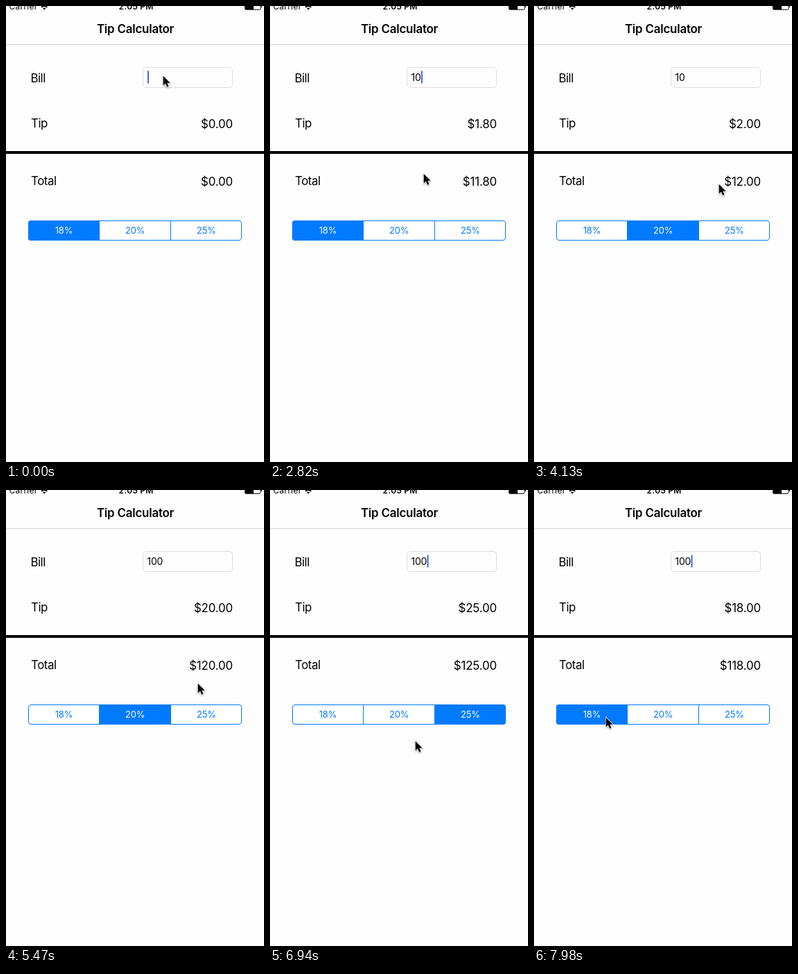
Write an HTML page that moves like this. It is 372 px wide and 657 px high and loops after 8 s.

```html
<!DOCTYPE html>
<html lang="en">
<head>
<meta charset="utf-8">
<title>Tip Calculator</title>
<style>
  html, body { margin: 0; width: 100%; height: 100%; overflow: hidden; background: #fefefe; }
  svg { display: block; width: 372px; height: 657px; }
  text { font-family: Inter, Roboto, "Liberation Sans", sans-serif; fill: #000; white-space: pre; }
  .label { font-size: 16.9px; letter-spacing: -.027em; }
  .money { font-size: 16.9px; letter-spacing: -.01em; text-anchor: end; }
  .title { font-size: 16.9px; font-weight: 600; letter-spacing: -.012em; }
  .status { font-size: 12px; letter-spacing: .02em; }
  .field { font-size: 14px; letter-spacing: -.02em; }
  .seg { font-size: 13px; letter-spacing: -.01em; }
  .mid { text-anchor: middle; }
  #cursor { filter: drop-shadow(0 1px .8px rgba(0, 0, 0, .4)); }
</style>
</head>
<body>
<svg viewBox="0 0 372 657">
  <defs><clipPath id="round"><rect x="32" y="309" width="308" height="29" rx="4"/></clipPath></defs>
  <rect width="372" height="657" fill="#fefefe"/>

  <text class="status" x="4.5" y="5">Carrier</text>
  <path d="M50.5 1.2Q55.3 -3 60 1.2L58.7 2.4Q55.3 -.4 51.9 2.4ZM53 3.2Q55.3 1.6 57.6 3.2L55.3 5.4Z"/>
  <text class="status mid" x="187.5" y="5" font-weight="600">2:05 PM</text>
  <rect x="344.5" y="-5" width="22.5" height="10.2" rx="1.5" fill="none" stroke="#000"/>
  <path d="M345 -4H357V5H345ZM368 -2H369V2H368Z"/>

  <text class="title mid" x="186.5" y="39">Tip Calculator</text>
  <rect y="55" width="372" height="1" fill="#d2d2d2"/>

  <text class="label" x="35.4" y="109.5">Bill</text>
  <text class="label" x="36" y="175.3">Tip</text>
  <text class="label" x="36" y="258.3">Total</text>
  <rect x="197.5" y="88.5" width="129" height="29" rx="4.5" fill="#fefefe" stroke="#dedede"/>
  <text class="field" id="bill" x="203.6" y="108"></text>
  <rect id="caret" y="93.5" width="2" height="18" fill="#4169e1"/>
  <text class="money" id="tip" x="327" y="175.8"></text>
  <rect y="209" width="372" height="4"/>
  <text class="money" id="total" x="327" y="258.8"></text>

  <g id="segs" clip-path="url(#round)"></g>
  <rect x="32.5" y="309.5" width="307" height="28" rx="3.5" fill="none" stroke="#007aff"/>
  <path d="M134 309H135V338H134ZM237 309H238V338H237Z" fill="#007aff"/>

  <path id="cursor" d="M.7 .7V14.6L3.9 11.6L6.2 16.8L8.5 15.8L6.3 10.7H10.6Z"
        stroke="#fff" stroke-width="1.3" paint-order="stroke"/>
</svg>
<script>
const LOOP = 8000;
const STEP = 147.6; // the screen refreshes once per step; all times below are in steps
const $ = id => document.getElementById(id);

const keys = [9, 10, 32];
const rates = [.18, .2, .25];
const taps = [{ at: 22.4, seg: 1 }, { at: 41, seg: 2 }, { at: 52.4, seg: 0 }];
const moves = [
  { from: 0, to: 4, x: 262, y: 100 },
  { from: 16, to: 21, x: 198, y: 318 },
  { from: 25, to: 28, x: 266, y: 256 },
  { from: 35, to: 40, x: 293, y: 318 },
  { from: 44, to: 47, x: 209, y: 361 },
  { from: 48, to: 50, x: 103, y: 327 }
];

const clamp = u => Math.min(1, Math.max(0, u));
const ramp = (t, a, b) => clamp((t - a) / (b - a));
const ease = u => u * u * (3 - 2 * u);
const blue = a => `rgb(${255 - 255 * a},${255 - 133 * a},255)`;
const money = n => '$' + n.toFixed(2);

function cursorAt(n) {
  let x = 226, y = 100;
  for (const m of moves) {
    const e = ease(ramp(n, m.from, m.to));
    x += (m.x - x) * e;
    y += (m.y - y) * e;
  }
  return `translate(${Math.round(x)} ${Math.round(y)})`;
}

// Solid after each key, then a soft blink once a second.
function caretAt(n) {
  const last = keys.filter(k => k <= n).pop() || 0;
  const u = (n - last) * STEP % 1000;
  return 1 - ramp(u, 400, 530) + ramp(u, 920, 980);
}

// A touched segment tints, then the selection crossfades over one step.
function segmentsAt(n) {
  const levels = [1, 0, 0];
  let chosen = 0;
  for (const { at, seg } of taps) {
    if (n < at - .5) break;
    const p = clamp(n - at);
    levels[chosen] = 1 - p;
    levels[seg] = .15 + .85 * p;
    if (p > 0) chosen = seg;
  }
  return { levels, chosen };
}

function add(parent, tag, attrs, text = '') {
  const el = document.createElementNS('http://www.w3.org/2000/svg', tag);
  for (const k in attrs) el.setAttribute(k, attrs[k]);
  el.textContent = text;
  return parent.appendChild(el);
}

const segs = rates.map((r, i) => ({
  box: add($('segs'), 'rect', { x: 32 + 102.7 * i, y: 309, width: 102.7, height: 29 }),
  text: add($('segs'), 'text', { class: 'seg mid', x: 83.5 + 102.7 * i, y: 328.3 }, r * 100 + '%')
}));

function draw(t) {
  const n = Math.floor((t + 10) / STEP);
  const { levels, chosen } = segmentsAt(n);
  const entry = '100'.slice(0, keys.filter(k => k <= n).length);
  const tip = entry * rates[chosen];

  $('bill').textContent = entry;
  $('tip').textContent = money(tip);
  $('total').textContent = money(+entry + tip);
  $('caret').setAttribute('x', 204 + (entry && $('bill').getComputedTextLength()));
  $('caret').setAttribute('opacity', caretAt(n));
  $('cursor').setAttribute('transform', cursorAt(n));

  segs.forEach(({ box, text }, i) => {
    const a = levels[i];
    box.style.fill = blue(a);
    text.style.fill = blue(a < .2 ? 1 : 1 - a);
  });
}

const start = performance.now();
function tick() {
  draw((performance.now() - start) % LOOP);
  requestAnimationFrame(tick);
}
tick();
</script>
</body>
</html>
```
